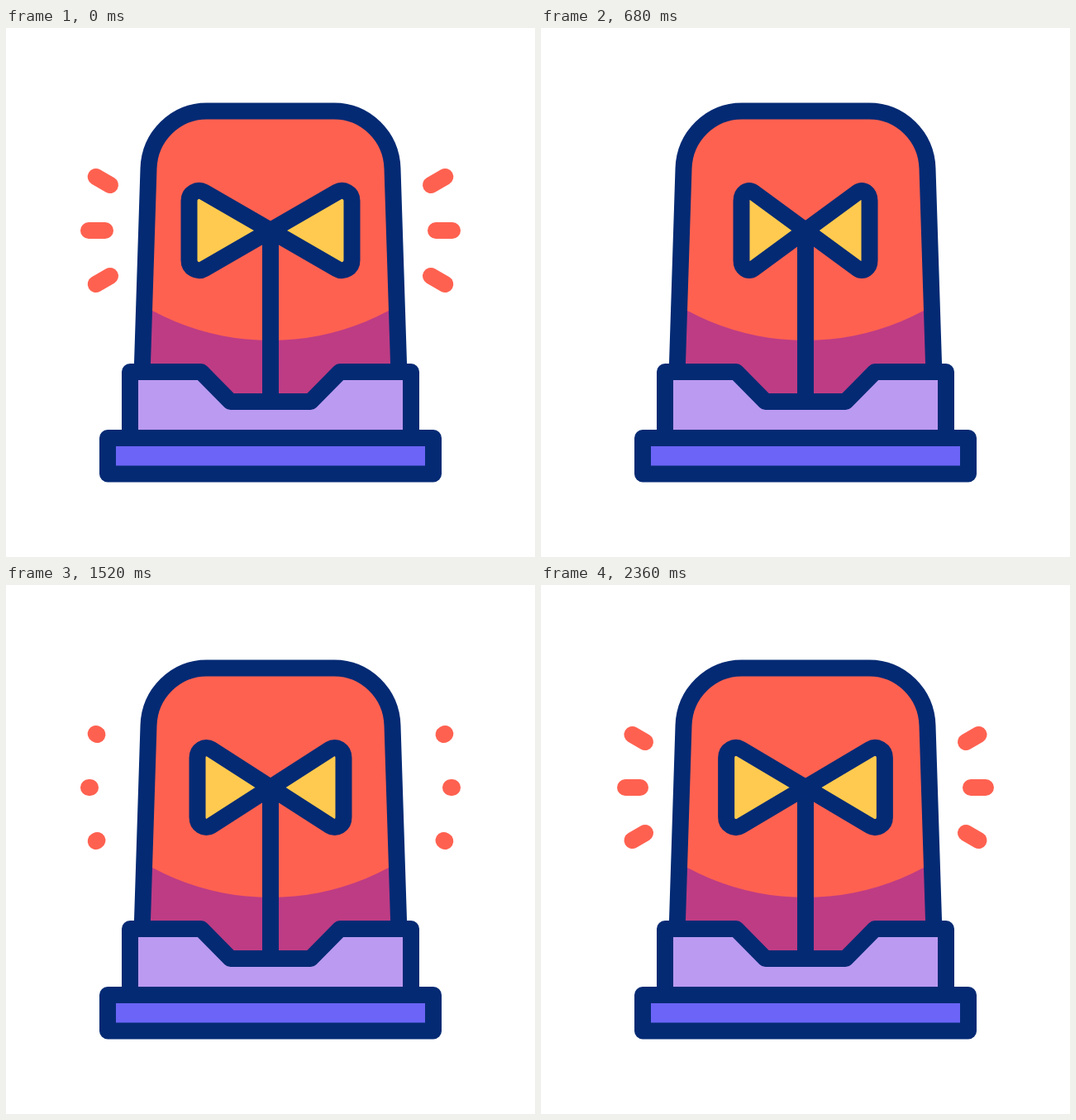
Animation of 640x640 px, one loop 2.4 s. Source, as an HTML page with a canvas:

```html
<!DOCTYPE html>
<html lang="en">
<head>
<meta charset="utf-8">
<title>Siren</title>
<style>
  html, body { margin: 0; height: 100%; overflow: hidden; background: #fff; }
  canvas { display: block; width: 100vw; height: 100vh; }
</style>
</head>
<body>
<canvas width="640" height="640"></canvas>
<script>
const ctx = document.querySelector('canvas').getContext('2d');
const LOOP = 2400;
const NAVY = '#042a74', RED = '#ff6150', PLUM = '#be3c84',
      LILAC = '#bb9af1', BLUE = '#6b64f6', YELLOW = '#ffca4f';

const dome = new Path2D('M163.5 452L172.5 170C173.7 131 205 100.5 243 100.5H397C435 100.5 466.3 131 467.5 170L476.5 452');
const housing = new Path2D('M150 496V416H236L271.5 452H368.5L404 416H490V496Z');
const foot = new Path2D('M123 496H517V539.5H123Z');
const pole = new Path2D('M320 245V452');
// Right-hand reflector, with its apex at the origin.
const reflector = new Path2D('M0 0L80.5 -46.5A12 12 0 0 1 98.5 -36V36A12 12 0 0 1 80.5 46.5Z');

// Left-hand rays as [inner x, inner y, outer x, outer y].
const rays = [
  [126, 190, 108.7, 180],
  [120, 245, 100, 245],
  [126, 300, 108.7, 310]
];

// Smooth 0..1 ramp lasting 400 ms.
function ramp(t, start) {
  const u = Math.min(1, Math.max(0, (t - start) / 400));
  return u * u * (3 - 2 * u);
}

function shape(path, fill) {
  if (fill) {
    ctx.fillStyle = fill;
    ctx.fill(path);
  }
  ctx.strokeStyle = NAVY;
  ctx.stroke(path);
}

function drawRays(t) {
  const second = t >= 1200;
  const from = ramp(t, second ? 1200 : 0);
  const grow = second ? 2040 : 800;
  const growing = t >= grow;
  const a = growing ? 0 : from;
  const b = growing ? ramp(t, grow) : 1;
  // The first cycle is fully grown when the second one begins to shrink.
  if (b - a < 0.0005) return;

  ctx.strokeStyle = RED;
  ctx.beginPath();
  for (const [x0, y0, x1, y1] of rays) {
    const xa = x0 + (x1 - x0) * a, ya = y0 + (y1 - y0) * a;
    const xb = x0 + (x1 - x0) * b, yb = y0 + (y1 - y0) * b;
    ctx.moveTo(xa, ya);
    ctx.lineTo(xb, yb);
    ctx.moveTo(640 - xa, ya);
    ctx.lineTo(640 - xb, yb);
  }
  ctx.stroke();
}

function drawReflectors(t) {
  const phase = t % 800;
  const width = Math.max(0.001, 1 - ramp(Math.min(phase, 800 - phase), 0));
  for (const side of [-1, 1]) {
    const path = new Path2D();
    path.addPath(reflector, new DOMMatrix([side * width, 0, 0, 1, 320, 245]));
    shape(path, YELLOW);
  }
}

function draw(t) {
  ctx.fillStyle = '#fff';
  ctx.fillRect(0, 0, 640, 640);
  ctx.lineWidth = 20;
  ctx.lineCap = ctx.lineJoin = 'round';

  drawRays(t);

  ctx.save();
  ctx.clip(dome);
  ctx.fillStyle = PLUM;
  ctx.fillRect(0, 0, 640, 640);
  ctx.fillStyle = RED;
  ctx.beginPath();
  ctx.arc(320, 76, 302, 0, 2 * Math.PI);
  ctx.fill();
  ctx.restore();

  shape(dome);
  shape(pole);
  drawReflectors(t);
  shape(housing, LILAC);
  shape(foot, BLUE);
}

function tick() {
  draw(performance.now() % LOOP);
  requestAnimationFrame(tick);
}
tick();
</script>
</body>
</html>
```
